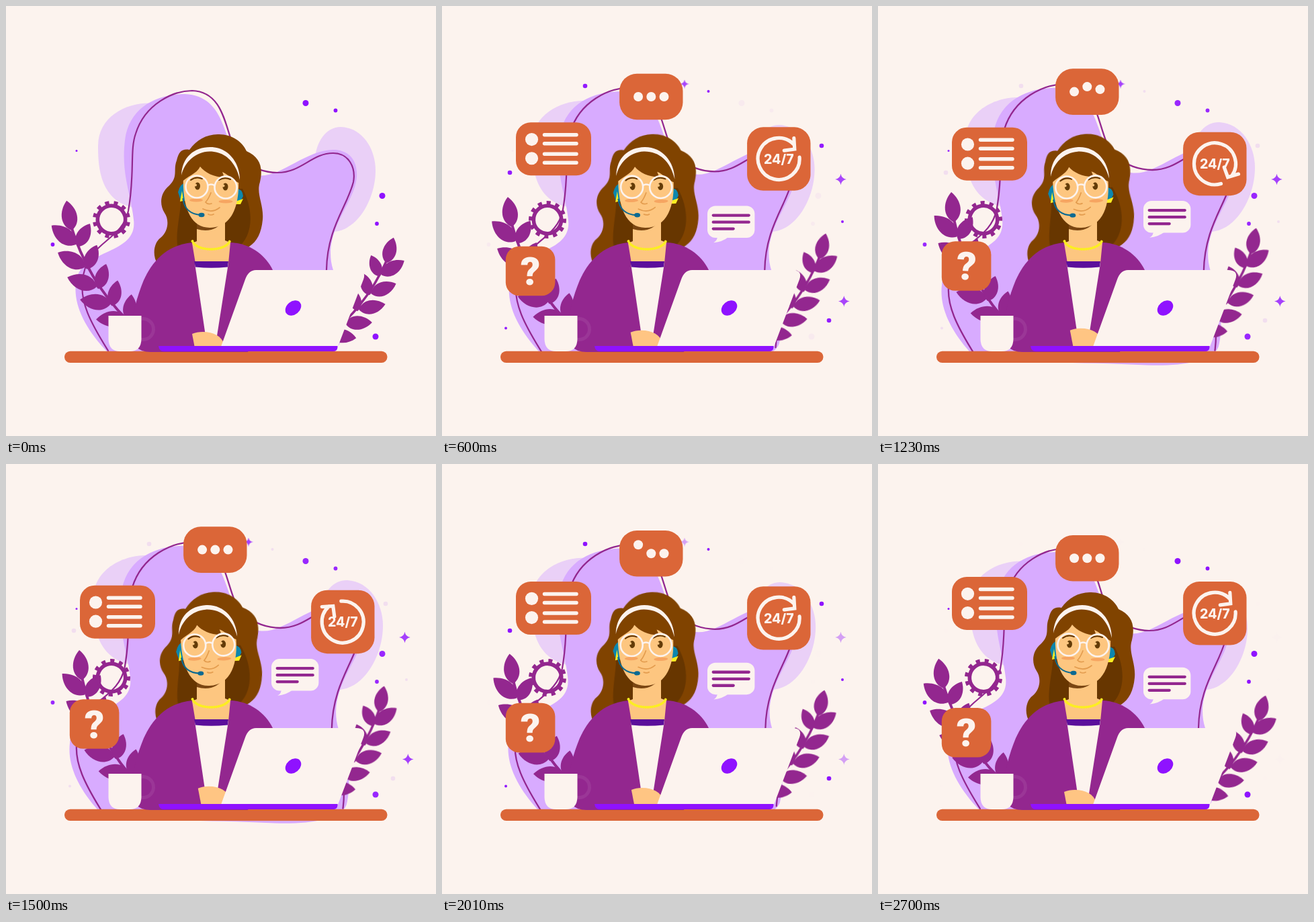
An HTML page for the animation above (2730 ms loop, 640 by 640 pixels).

```html
<!DOCTYPE html>
<html lang="en">
<head>
<meta charset="utf-8">
<title>Support desk</title>
<style>
  html, body { margin: 0; width: 100%; height: 100%; overflow: hidden; background: #fcf3ee; }
  svg { display: block; width: 100vw; height: 100vh; }
  text { text-anchor: middle; fill: #fcf3ee; }
  .plum { fill: #93278f; }
  .paper { fill: #fcf3ee; }
  .orange { fill: #db6638; }
  .violet { fill: #8f12ff; }
  .hair { fill: #804300; }
  .skin { fill: #fdc680; }
  .teal { fill: #0c86ad; }
  .yellow { fill: #fcee21; }
  .line { fill: none; stroke-linecap: round; }
  .white { stroke: #fcf3ee; }
  .ink { stroke: #93278f; }
</style>
</head>
<body>
<svg viewBox="0 0 640 640">
  <g id="blob">
    <g fill="#ead0f7">
      <path d="M235 148C200 136 137 155 137 208C137 235 138 290 190 300L260 200Z"/>
      <path d="M460 224C464 196 480 180 498 180C530 181 550 212 550 245C550 285 525 333 488 336L470 280Z"/>
    </g>
    <path fill="#d8abff" d="M150 514C118 480 100 445 104 412C109 360 197 372 190 318C186 280 171 250 177 200C183 150 225 131 266 131C330 134 322 205 350 235C385 284 435 214 487 214C515 214 526 236 521 262C513 300 470 340 487 393C495 425 508 460 498 500C490 522 440 528 395 526C300 521 200 524 150 514Z"/>
    <path class="line ink" stroke-width="2.2" d="M152 513C125 470 110 440 114 410C118 350 172 352 182 305C192 250 184 215 193 190C207 145 250 126 277 126C332 128 325 200 348 224C365 243 388 248 404 248C440 248 455 219 487 219C510 219 521 240 517 262C508 298 478 330 477 393C480 430 500 450 493 505"/>
  </g>

  <g class="violet"><g id="dotsA"></g><g id="dotsB"></g><g id="stars"></g></g>

  <g id="plantL"><g id="sprig" class="plum"><path class="line ink" stroke-width="4" d="M96 325Q121 408 180 467"/></g></g>
  <g id="plantR"><use href="#sprig" transform="translate(577 345) rotate(6.5) scale(-.875 .875) translate(-90 -290)"/></g>
  <g id="gear" class="line ink">
    <circle r="20.700" stroke-width="5.600"/>
    <circle r="25.300" stroke-width="5.400" stroke-linecap="butt" pathLength="12" stroke-dasharray=".46 .54"/>
  </g>

  <g id="hairBack">
    <path class="hair" d="M315 191C335 190 352 202 358 216C378 225 383 240 378 262C372 280 384 295 382 318C380 338 374 350 362 358L330 378L226 384C217 372 220 352 230 345C242 335 243 318 236 308C228 295 230 280 240 270C258 255 248 245 254 230C257 216 263 212 273 214C283 200 298 191 315 191Z"/>
    <path fill="#673600" d="M260 270C264 300 250 335 256 362H342C368 345 370 305 352 272Z"/>
  </g>

  <rect class="orange" x="87" y="513.700" width="480.500" height="17.300" rx="8.600"/>
  <path class="plum" d="M277 352C237 356 217 382 205 408C195 432 188 460 185 482Q186 515 215 515H360L397 393C386 370 362 353 334 352Z"/>
  <path class="skin" d="M284 310V350L277 353L282 383H331L334 352L326 349V305Z"/>
  <path fill="#7a4612" d="M284 315V332Q311 340 327 316Z"/>
  <path class="paper" d="M281 383H331L314 491H297Z"/>
  <path fill="#5b0f9b" d="M280 380H331L330 388.500Q305 391 282 388.500Z"/>
  <path class="line" stroke="#fcee21" stroke-width="4" stroke-dasharray=".1 3.200" d="M277.500 350C284 366 326 366 333 350"/>

  <g id="head">
    <path class="teal" d="M269 262Q259 264 256 277L260 290H270Z"/>
    <path class="teal" d="M343 272Q352 272 353 283L349 291H340Z"/>
    <path class="yellow" d="M262 275L264 290L259 291Z"/>
    <path class="yellow" d="M341 291L353 287L349 295H342Z"/>
    <path class="skin" d="M264 252C262 300 275 330 303 330C335 330 348 300 346 255C330 225 285 225 264 252Z"/>
    <path class="hair" d="M261 263C262 235 280 214 304 214C330 214 347 240 348 264C338 260 330 250 322 247L325 255C310 255 296 248 289 239C284 250 268 254 261 263Z"/>
    <path class="paper" d="M261 252C262 225 280 210 304 210C330 210 348 232 348 259C342 231 325 216.500 303 216.500C282 217 266 232 261 252Z"/>
    <g fill="#f6a561"><ellipse cx="283" cy="289" rx="10" ry="2.600"/><ellipse cx="327" cy="291" rx="10.500" ry="2.600"/></g>
    <g class="line" stroke="#5e3200" stroke-width="2">
      <path d="M275 259Q283 253 292 257"/><path d="M317 259Q325 254 334 258"/>
    </g>
    <g fill="#643c08"><ellipse cx="285" cy="268" rx="4" ry="5.500"/><ellipse cx="326.500" cy="269" rx="4" ry="5.500"/></g>
    <g class="skin"><circle cx="282" cy="266.500" r="2"/><circle cx="323.500" cy="267.500" r="2"/></g>
    <g class="line" stroke="#e39c4e" stroke-width="1.700">
      <path d="M305 278Q301 288 297 292Q300 296 306 294"/><path d="M293 302Q307 309 318 300"/><path d="M301 310Q305 312 309 310"/>
    </g>
    <g class="line white" stroke-width="2.600">
      <circle cx="284" cy="269" r="16.500"/><circle cx="327" cy="270" r="16.500"/>
      <path d="M300.500 267Q305 264 310.500 267"/>
    </g>
    <path class="line" stroke="#0b6a92" stroke-width="2.200" d="M263.500 287C265 302 275 310 290 311"/>
    <ellipse cx="291" cy="311" rx="4.500" ry="3.200" fill="#0b6a92"/>
  </g>

  <path id="hand" fill="#ffc583" d="M277 488Q284 485 293 485C309 485 321 492 324 502V514H282Z"/>
  <path class="paper" d="M320 507L356 407Q361 393 372 393H521Q537 393 532 407L494 507Z"/>
  <ellipse class="violet" cx="427.500" cy="449.500" rx="13" ry="9.800" transform="rotate(-40 427.500 449.500)"/>
  <circle class="line" cx="204" cy="481" r="15.500" stroke="#fff" stroke-opacity=".07" stroke-width="5"/>
  <path class="paper" d="M152.500 461H201.500V496Q201 514 184 514H170Q153 514 152.500 496Z"/>
  <path class="violet" d="M227 506H493.500V508Q493 514 487 514H235Q228 514 227 506Z"/>

  <g transform="translate(166 207.500)"><g class="bubble" data-drift="13">
    <rect class="orange" x="-56" y="-39.500" width="112" height="79" rx="22"/>
    <g class="paper"><circle cx="-32.500" cy="-14.200" r="9.600"/><circle cx="-32.500" cy="14" r="9.600"/></g>
    <path class="line white" stroke-width="5.500" d="M-13.500-21H34M-13.500-8H34M-13.500 7.500H34M-13.500 20.500H34"/>
  </g></g>
  <g transform="translate(311.300 140.300)"><g class="bubble" data-drift="-13">
    <rect class="orange" x="-47.200" y="-34.300" width="94.400" height="68.600" rx="26"/>
    <g id="typing" class="paper"><circle cx="-19.200" r="7"/><circle r="7"/><circle cx="19.200" r="7"/></g>
  </g></g>
  <g transform="translate(501.300 222.300)"><g class="bubble" data-drift="13">
    <rect class="orange" x="-47.200" y="-47.200" width="94.400" height="94.400" rx="24"/>
    <path id="arrow" class="line white" stroke-width="5.200" d="M30.800-2.500A31 31 0 1 1 23-20.800M22.500-31L23.500-14.500L8-12.500"/>
    <text y="7.500" font-size="19.500" font-weight="800" font-family="Inter, sans-serif">24/7</text>
  </g></g>
  <g transform="translate(131.600 399.700)"><g class="bubble" data-drift="-13">
    <rect class="orange" x="-36.800" y="-36.800" width="73.600" height="73.600" rx="20"/>
    <text id="mark" y="20.500" font-size="58" font-weight="900" font-family="Roboto, sans-serif">?</text>
  </g></g>
  <g transform="translate(430.200 326.500)"><g class="bubble" data-drift="-13">
    <rect class="paper" x="-35.200" y="-23.700" width="70.400" height="47.400" rx="12"/>
    <path class="paper" d="M-20 20Q-20 28-26 31Q-13 30-3 22Z"/>
    <path class="line ink" stroke-width="4.300" d="M-26.500-9.700H26.500M-26.500.4H26.500M-26.500 10.300H3.500"/>
  </g></g>
</svg>
<script>
const LOOP = 2730, STEP = 30, TAU = Math.PI * 2;
const $ = id => document.getElementById(id);
const put = (id, transform) => $(id).setAttribute('transform', transform);
const fade = (id, opacity) => $(id).setAttribute('opacity', opacity);
const clamp = x => Math.min(1, Math.max(0, x));
const wave = (t, period) => (1 - Math.cos(TAU * t / period)) / 2;
const ease = x => wave(clamp(x), 2);
const quad = (a, b, c, u) => a * (1 - u) ** 2 + 2 * b * u * (1 - u) + c * u * u;

// Adds a unit shape, placed, turned and scaled
function add(id, d, x, y, angle, size) {
  const el = document.createElementNS('http://www.w3.org/2000/svg', 'path');
  el.setAttribute('d', d);
  el.setAttribute('transform', `translate(${x} ${y}) rotate(${angle}) scale(${size})`);
  $(id).append(el);
}

const LEAF = 'M0 0C.2 .35 .68 .33 1 0C.68-.33 .2-.35 0 0Z';
const DOT = 'M-1 0A1 1 0 1 1 1 0A1 1 0 1 1-1 0Z';
const STAR = 'M0-1Q.14-.14 1 0Q.14.14 0 1Q-.14.14-1 0Q-.14-.14 0-1';

// One leaf at the top, then pairs that open wider down the stem
add('sprig', LEAF, 98, 334, -100, 45);
for (let i = 0; i < 5; i++) {
  const x = quad(104, 128, 180, i / 4), y = quad(355, 426, 465, i / 4);
  add('sprig', LEAF, x, y, -142 - 10 * i, 46);
  add('sprig', LEAF, x + 2, y + 3, -61 - 5.5 * i, 39);
}

// Large and small dots take turns
const scatter = (id, shape, points, big, small) =>
  points.forEach(([x, y], i) => add(id, shape, x, y, 0, i % 2 ? small : big));
scatter('dotsA', DOT, [[446, 144.5], [490.5, 155.5], [560, 282.5], [552, 324], [550, 492], [69.5, 355]], 4.5, 2.9);
scatter('dotsB', DOT, [[213, 119], [396.5, 127], [565, 208], [596, 321], [576, 468], [95, 479.5], [101, 248]], 3.3, 2);
scatter('stars', STAR, [[593.5, 258], [361, 116], [598.3, 439.5]], 8.3, 6.5);
add('dotsA', DOT, 105, 215.5, 0, 1.5);

const bubbles = document.querySelectorAll('.bubble');
const dots = [...$('typing').children];

function draw(t) {
  const p = wave(t, LOOP);
  put('blob', `translate(304 337) scale(${1 + .046 * p}) translate(-304 -337)`);
  put('plantL', `rotate(${5 * p} 247 505)`);
  put('plantR', `rotate(${-5 * p} 404 503)`);
  put('gear', `translate(157 318) rotate(${8 + 360 * t / LOOP})`);
  for (const id of ['hairBack', 'head']) put(id, `rotate(${-2.9 * p} 303 335)`);
  put('hand', `translate(${9 * p} ${-5.5 * p})`);

  fade('dotsA', 1 - wave(t, LOOP / 2));
  fade('dotsB', wave(t, LOOP / 2));
  fade('stars', wave(t, LOOP / 3));

  bubbles.forEach((b, i) => {
    const size = ease((t - 30 - 60 * i) / 270);
    b.setAttribute('transform', `translate(0 ${b.dataset.drift * p}) scale(${size})`);
  });

  // Dots hop one after another
  dots.forEach((dot, i) => {
    const hop = t < 880 ? 0 : clamp(((t - 880) % 1020 - i * 165) / 230);
    dot.setAttribute('cy', -13 * Math.sin(Math.PI * hop));
  });
  put('arrow', `rotate(${360 * ease((t - 1000) / 750)})`);
  put('mark', `rotate(${8 * Math.sin(2 * TAU * clamp((t - 930) / 420))})`);
}

const begin = performance.now();
function tick() {
  const t = (performance.now() - begin) % LOOP;
  draw(Math.floor(t / STEP) * STEP);
  requestAnimationFrame(tick);
}
tick();
</script>
</body>
</html>
```
